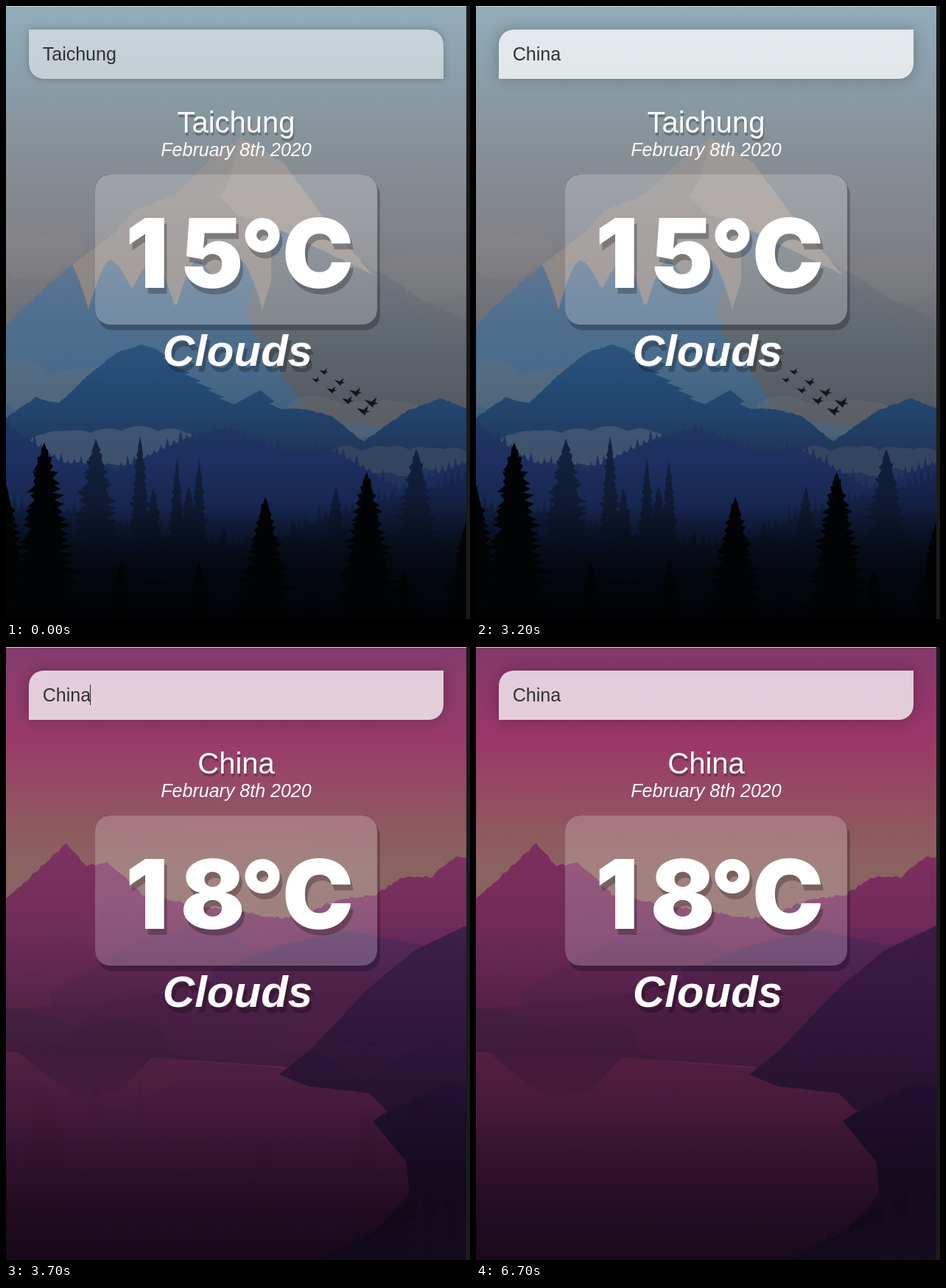
An HTML page with a canvas that plays this animation: 630 by 833 pixels, repeating every 6.8 s.

```html
<!DOCTYPE html>
<html lang="en">
<head>
<meta charset="utf-8">
<title>Weather</title>
<style>
html, body { margin: 0; width: 100%; height: 100%; overflow: hidden; background: #1b1b1c; }
canvas { display: block; }
</style>
</head>
<body>
<canvas id="stage" width="630" height="833"></canvas>
<script>
const W = 630, H = 833, PAGE = 625, LOOP = 6800;
const SANS = '"Liberation Sans", Arial, sans-serif';
const ctx = document.getElementById('stage').getContext('2d');

function seeded(s) {
  s *= 7919;
  return () => (s = (s * 16807) % 2147483647) / 2147483647;
}

const lerp = (a, b, k) => a + (b - a) * k;

// Vertical gradient with evenly spaced colours
function fade(g, y0, y1, ...colours) {
  const gr = g.createLinearGradient(0, y0, 0, y1);
  colours.forEach((c, i) => gr.addColorStop(i / (colours.length - 1), c));
  return gr;
}

function trace(pts) {
  const p = new Path2D();
  for (let i = 0; i < pts.length; i += 2) p.lineTo(pts[i], pts[i + 1]);
  p.closePath();
  return p;
}

function poly(g, fill, pts) {
  g.fillStyle = fill;
  g.fill(trace(pts));
}

// Follow key points in small steps, each raised by lift(i)
function ridge(pts, lift, step = 4) {
  const out = [];
  let n = 0;
  for (let i = 0; i + 3 < pts.length; i += 2) {
    const [x0, y0, x1, y1] = pts.slice(i, i + 4);
    for (let x = x0; x < x1; x += step) {
      out.push(x, lerp(y0, y1, (x - x0) / (x1 - x0)) - lift(n++));
    }
  }
  return [...out, ...pts.slice(-2)];
}

function rough(pts, amp, seed) {
  const rnd = seeded(seed);
  return ridge(pts, () => (rnd() - 0.5) * amp);
}

function treetops(pts, amp, seed) {
  const rnd = seeded(seed);
  return ridge(pts, i => (i % 3 === 1 ? rnd() * amp : -2), 3);
}

const grounded = pts => [...pts, pts[pts.length - 2], H, pts[0], H];

function land(g, fill, pts) {
  poly(g, fill, grounded(pts));
}

// Descending saw edge whose teeth are cut back by `cut`
function jag(x0, y0, x1, y1, n, cut) {
  const out = [x0, y0];
  for (let i = 1; i <= n; i++) {
    const x = lerp(x0, x1, i / n), y = lerp(y0, y1, i / n);
    out.push(x, y, x - cut, y + 2);
  }
  return out;
}

// Row of overlapping cloud puffs
function bank(g, fill, x0, x1, y, r, seed) {
  const rnd = seeded(seed), p = new Path2D();
  for (let x = x0; x <= x1; x += r * 0.7) {
    const s = r * (0.6 + rnd() * 0.6), cy = y + (rnd() - 0.5) * r;
    p.moveTo(x + s * 1.5, cy);
    p.ellipse(x, cy, s * 1.5, s, 0, 0, 7);
  }
  g.fillStyle = fill;
  g.fill(p);
}

function tree(g, x, top, half, fill, seed, height = half * 4) {
  const rnd = seeded(seed), n = Math.round(height / 10), step = height / n;
  g.fillStyle = fill;
  for (const side of [-1, 1]) {
    const pts = [x, top - 4];
    for (let i = 1; i <= n; i++) {
      const w = side * half * (i / n) ** 0.72, y = top + i * step;
      pts.push(x + w * lerp(0.45, 0.65, rnd()), y - step * 0.5);
      pts.push(x + w * lerp(0.75, 1.15, rnd()), y + step * (rnd() - 0.4));
    }
    poly(g, fill, [...pts, x, top + height]);
  }
}

function bird(g, x, y, s) {
  const wing = [-1, -.4, 0, -.15, .7, -.75, .5, 0, 1, .1, .3, .3, .2, .7, -.3, .3];
  poly(g, '#14151b', wing.map((v, i) => (i % 2 ? y : x) + v * s));
}

function scene(draw) {
  const c = document.createElement('canvas');
  c.width = W;
  c.height = H;
  draw(c.getContext('2d'));
  return c;
}

const cold = scene(g => {
  g.fillStyle = fade(g, 0, 600, '#92adba', '#8a9ea9', '#868f96', '#82848a', '#727479', '#5e6269', '#484d58');
  g.fillRect(0, 0, W, H);
  bank(g, 'rgba(165,150,140,.13)', 0, 90, 335, 26, 4);
  bank(g, 'rgba(160,145,135,.1)', 520, 626, 370, 30, 9);

  // Far slope on the right
  land(g, fade(g, 360, 580, '#72777d', '#5e646b', '#4c5058'), rough([410, 300, 505, 360, 570, 402, 626, 427], 3, 2));

  // Great mountain: body, shaded side, snow, lit face
  const peak = grounded(rough([0, 433, 60, 376, 150, 305, 172, 280, 230, 255, 280, 206, 318, 178,
    376, 212, 440, 300, 510, 378, 626, 480], 3, 5));
  poly(g, fade(g, 320, 580, '#687b8f', '#527090', '#486a8a', '#3f5a76'), peak);
  g.save();
  g.clip(trace(peak));
  poly(g, fade(g, 330, 580, '#727981', '#5f676f', '#50555c'),
    [350, 340, 330, 398, ...jag(325, 420, 420, 560, 7, 10), 626, 580, 626, 300]);
  const snowline = [];
  for (let x = 40; x <= 360; x += 4) {
    const k = (x - 112) / 59, tooth = 1 - 2 * Math.abs(k - Math.round(k));
    snowline.push(x, 345 + 68 * tooth ** 1.6 * (Math.round(k) % 2 ? 0.6 : 1));
  }
  poly(g, fade(g, 180, 410, '#959496', '#928c8a', '#8a8482'), [40, 150, ...snowline, 360, 150]);
  poly(g, fade(g, 180, 380, '#9b9997', '#a09893', '#908984'),
    [318, 178, 304, 235, 290, 258, 314, 284, ...jag(345, 292, 499, 366, 6, -6), 499, 178]);
  g.restore();

  // Low clouds
  bank(g, 'rgba(100,110,120,.4)', 0, 130, 515, 24, 3);
  bank(g, 'rgba(112,112,116,.3)', 400, 540, 560, 24, 6);

  // Blue hills
  const hill = fade(g, 455, 610, '#2c547d', '#244c76', '#22426a', '#203557');
  land(g, hill, rough([330, 545, 405, 548, 440, 556, 485, 592, 545, 550, 590, 533, 626, 547], 2, 8));
  land(g, hill, [...rough([0, 560, 40, 532, 72, 540, 110, 503, 150, 471, 185, 460], 2, 3),
    ...jag(203, 466, 312, 542, 7, 7), ...jag(345, 522, 405, 570, 3, 8), 430, 600]);

  // Mist, then the far forest
  bank(g, 'rgba(75,95,120,.7)', 55, 250, 598, 20, 7);
  bank(g, 'rgba(70,84,104,.5)', 450, 615, 616, 16, 2);
  land(g, fade(g, 560, 800, '#213862', '#1d2f60', '#16264e', '#0d1834', '#070c18'),
    treetops([0, 566, 75, 618, 150, 630, 245, 585, 300, 572, 380, 603, 440, 600, 535, 655, 626, 618], 14, 11));
  land(g, fade(g, 650, H, '#15254d', '#0d1934', '#060b16', '#020409'),
    treetops([0, 680, 110, 688, 230, 722, 350, 735, 440, 690, 530, 665, 626, 640], 22, 23));

  // Middle trees
  const mid = fade(g, 590, 760, '#14233f', '#0e1a32', '#080f1e'), rnd = seeded(17);
  [[122, 592, 36], [182, 588, 18], [232, 620, 16], [262, 621, 16], [448, 657, 28], [557, 606, 36]]
    .forEach(([x, top, half], i) => tree(g, x, top, half, mid, i + 3, 130));
  for (let x = 200; x < 620; x += 48) tree(g, x, 655 + rnd() * 70, 24, mid, x, 120);
  g.fillStyle = fade(g, 680, H, 'rgba(3,6,12,0)', 'rgba(3,6,12,.65)', 'rgba(1,2,5,.95)');
  g.fillRect(0, 680, W, H);

  // Front trees
  [[52, 597, 62], [490, 637, 54], [352, 671, 58], [0, 654, 38], [624, 707, 38],
   [155, 761, 34], [262, 760, 34], [540, 769, 34]]
    .forEach(([x, top, half], i) => tree(g, x, top, half, '#020305', i + 31));

  // Flock, zigzagging down to the right
  for (let i = 0; i < 9; i++) {
    const x = 410 + i * 10.8;
    bird(g, x, 490 + i * 7 + (i % 2 ? 11 : -7), 5 + i * 0.6);
  }
});

const warm = scene(g => {
  g.fillStyle = fade(g, 0, 360, '#83386b', '#8f376a', '#9a3668', '#974664', '#90565f', '#8b6360', '#86605e');
  g.fillRect(0, 0, W, H);

  // Mountain layers, far to near
  land(g, fade(g, 265, 500, '#7e2f60', '#702a58', '#522044'),
    rough([0, 343, 82, 267, 109, 298, 138, 292, 184, 336, 265, 352, 372, 368, 400, 365, 452, 343, 503, 336,
      538, 313, 578, 312, 611, 284, 626, 288], 4, 12));
  land(g, fade(g, 370, 500, '#6c2a5c', '#4c1f43'), [60, 470, 180, 400, 270, 374, 340, 412, 465, 383, 626, 380]);
  land(g, fade(g, 385, 520, '#54285a', '#431b42'), [280, 440, 375, 405, 465, 385, 560, 405, 626, 400]);
  land(g, fade(g, 430, 570, '#52214a', '#421a3b'), [0, 492, 130, 484, 230, 468, 330, 437, 430, 438, 626, 470]);
  land(g, fade(g, 490, 550, '#452040', '#401a38'),
    rough([0, 490, 70, 502, 100, 520, 155, 504, 214, 520, 220, 546, 250, 562], 2, 4));

  // Lake with reflected hill and far shore
  land(g, fade(g, 550, H, '#552042', '#471a3a', '#34132e', '#230d22', '#190a1b'), [0, 550, 195, 558, 380, 571, 626, 575]);
  poly(g, fade(g, 545, 615, '#421a39', '#451a39'), rough([15, 549, 62, 588, 100, 614, 158, 602, 197, 558], 3, 6));
  poly(g, 'rgba(125,52,82,.3)', [190, 557, 378, 570, 378, 573]);

  // Right mountain and wooded bank
  poly(g, fade(g, 378, H, '#3d1c46', '#33163d', '#27122f', '#190d22', '#120a18'),
    [626, 378, 555, 412, 492, 464, 410, 550, 371, 581, 410, 597, 492, 606, 518, 631, 498, 644, 544, 700,
     549, 740, 500, 795, 420, H, 626, H]);
  poly(g, fade(g, 590, H, '#211030', '#160b1f', '#100914'),
    [498, 644, 555, 614, 598, 592, 626, 600, 626, H, 440, H, 500, 795, 548, 750, 544, 700]);
  land(g, '#140b1d', treetops([440, 828, 530, 785, 626, 755], 18, 5));
  for (const x of [562, 590, 617]) tree(g, x, 710 + (617 - x) * 0.4, 18, '#150c20', x, 130);
});

// CSS "ease": cubic-bezier(.25, .1, .25, 1)
function ease(x) {
  if (x <= 0) return 0;
  if (x >= 1) return 1;
  const bez = (a, b, u) => 3 * a * u * (1 - u) ** 2 + 3 * b * u * u * (1 - u) + u ** 3;
  let lo = 0, hi = 1;
  for (let i = 0; i < 20; i++) {
    const u = (lo + hi) / 2;
    if (bez(0.25, 0.25, u) < x) lo = u; else hi = u;
  }
  return bez(0.1, 1, lo);
}

// Translucent card whose shadow stays outside its own shape
function card(x, y, w, h, radii, fill, dx, dy, blur) {
  const shape = new Path2D(), outside = new Path2D();
  shape.roundRect(x, y, w, h, radii);
  outside.rect(0, 0, W, H);
  outside.addPath(shape);
  ctx.save();
  ctx.clip(outside, 'evenodd');
  ctx.fillStyle = '#000';
  ctx.shadowColor = 'rgba(0,0,0,.25)';
  ctx.shadowOffsetX = dx;
  ctx.shadowOffsetY = dy;
  ctx.shadowBlur = blur;
  ctx.fill(shape);
  ctx.restore();
  ctx.fillStyle = fill;
  ctx.fill(shape);
}

function label(text, x, y, font, dx = 0, dy = 0) {
  ctx.font = font;
  if (dy) {
    ctx.fillStyle = 'rgba(0,0,0,.25)';
    ctx.fillText(text, x + dx, y + dy);
  }
  ctx.fillStyle = '#fff';
  ctx.fillText(text, x, y);
}

// Heavy glyph placed by the centre of its ink
function glyph(ch, cx, baseline = 383) {
  const font = '900 130px Inter, Roboto, sans-serif';
  ctx.font = font;
  const m = ctx.measureText(ch);
  label(ch, cx - (m.actualBoundingBoxRight - m.actualBoundingBoxLeft) / 2, baseline, font, 3.75, 7.5);
}

const typing = [[1900, 'C'], [2100, 'Ch'], [2200, 'Chi'], [2400, 'Chin'], [2700, 'China']];

function searchBar(t) {
  const k = t < 500 ? 0 : ease((t - 400) / 400), r = 20 * k;
  card(31, 32, 563, 67, [r, 20 - r, r, 20 - r], `rgba(255,255,255,${0.5 + 0.25 * k})`, 0, 0, 10 + 10 * k);

  const [keyAt, text] = typing.filter(([at]) => t >= at).pop() || [0, 'Taichung'];
  const selected = t >= 800 && !keyAt;
  ctx.font = '25px ' + SANS;
  ctx.textAlign = 'left';
  if (selected) {
    ctx.fillStyle = '#0078d7';
    ctx.fillRect(50, 51, 100, 28);
  }
  ctx.fillStyle = selected ? '#fff' : '#313131';
  ctx.fillText(text, 49.75, 74);

  const caret = keyAt && t < 6700 && Math.floor((t - keyAt) / 485) % 2 === 0;
  if (caret) {
    ctx.fillStyle = '#222';
    ctx.fillRect(Math.floor(49.55 + ctx.measureText(text).width), 51, 1, 28);
  }
}

function render(t) {
  const arrived = t >= 3500;
  ctx.drawImage(cold, 0, 0);
  if (arrived) {
    ctx.globalAlpha = ease((t - 3400) / 400);
    ctx.drawImage(warm, 0, 0);
    ctx.globalAlpha = 1;
  }
  searchBar(t);

  ctx.textAlign = 'center';
  label(arrived ? 'China' : 'Taichung', 312.5, 172, '40px ' + SANS, 1.25, 3.75);
  label('February 8th 2020', 312.5, 204, 'italic 25px ' + SANS);
  label('Clouds', 314.5, 489, 'italic bold 60px ' + SANS, 3.75, 7.5);

  card(121, 229, 383, 204, 20, 'rgba(255,255,255,.2)', 3.75, 7.5, 0);
  ctx.textAlign = 'left';
  glyph('1', 191);
  glyph(arrived ? '8' : '5', 280.5);
  glyph('°', 348);
  glyph('C', 424);

  // Window edges
  ctx.fillStyle = '#c3cdd2';
  ctx.fillRect(0, 0, PAGE, 1);
  ctx.fillStyle = '#1b1b1c';
  ctx.fillRect(PAGE, 0, W - PAGE, H);
}

const start = performance.now();
let last = -1;
function tick() {
  const t = Math.floor(((performance.now() - start) % LOOP) / 100) * 100;
  if (t !== last) render(last = t);
  requestAnimationFrame(tick);
}
tick();
</script>
</body>
</html>
```
